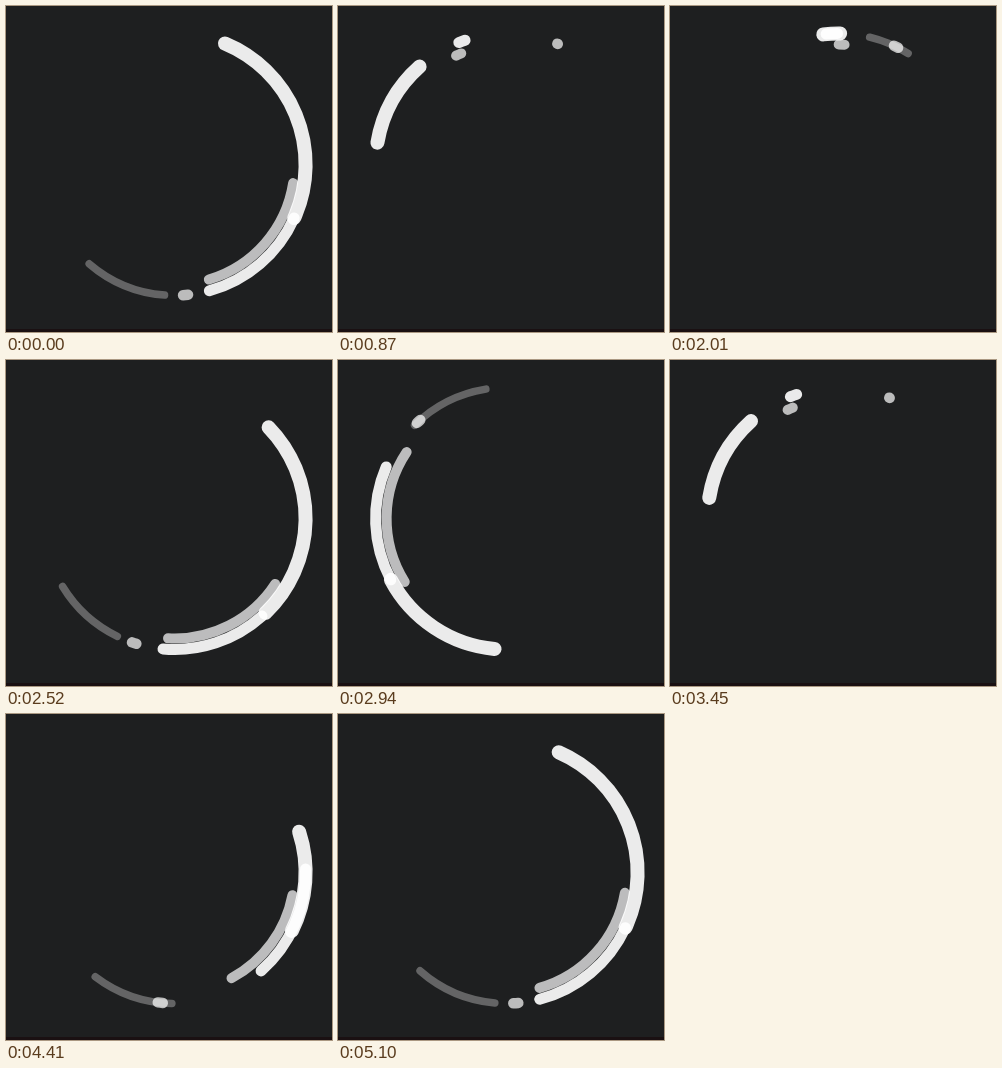
An HTML page with a canvas for the animation above (5.13 s loop, 326 by 326 pixels).

```html
<!DOCTYPE html>
<html lang="en">
<head>
<meta charset="utf-8">
<title>Ring loader</title>
<style>
  html, body { margin: 0; width: 100%; height: 100%; overflow: hidden; background: #1e1f20; }
  canvas { display: block; width: 326px; height: 326px; }
</style>
</head>
<body>
<canvas id="stage"></canvas>
<script>
const SIZE = 326, LOOP = 5130, TICK = 30;
const CENTER = { x: 168.6, y: 158.5 };

// Loop time in ms -> number of two-turn cycles completed
const CLOCK = [[0, 0], [870, 0.6901], [3450, 2.6909], [5100, 3.9989], [LOOP, 4]];

// Key positions within one cycle; angles run counter-clockwise from the right
const KEYS = [0, 0.2955, 0.4519, 0.5743, 0.6901];
const TURN = 720;
const ARCS = [
  { r: 131, width: 7.5, alpha: 0.31,
    tail: [-130.7, 99.2, 232.7, 418, 440], head: [-94.4, 134.7, 268.8, 436.3, 440] },
  { r: 131, width: 10.5, alpha: 0.7,
    tail: [-86.3, 131.3, 262.6, 423, 427], head: [-84.1, 133.3, 264.8, 425, 427.2] },
  { r: 120, width: 10, alpha: 0.7,
    tail: [-73.4, 146.5, 298.3, 447.2, 472.2], head: [-8.9, 212, 349.1, 450, 474.9] },
  { r: 131, width: 14, alpha: 0.91,
    tail: [-24.1, 208, 333.5, 449.4, 491.6], head: [67.4, 264.8, 378.1, 456.8, 530.4] },
  { r: 131, width: 11, alpha: 0.91,
    tail: [-74.6, 156.9, 311.3, 450.5, 468.5], head: [-24.1, 208, 361.5, 455.5, 471.4] }
];

// Smooth monotone curve through the keys, gaining TURN degrees per cycle
function makeCurve(values) {
  const n = KEYS.length;
  const wrap = i => ((i % n) + n) % n;
  const x = i => KEYS[wrap(i)] + Math.floor(i / n);
  const y = i => values[wrap(i)] + Math.floor(i / n) * TURN;
  const step = i => x(i + 1) - x(i);
  const rate = i => (y(i + 1) - y(i)) / step(i);
  const slope = i => {
    const a = rate(i - 1), b = rate(i);
    if (a * b <= 0) return 0;
    const u = 2 * step(i) + step(i - 1), v = step(i) + 2 * step(i - 1);
    return (u + v) / (u / a + v / b);
  };
  return p => {
    let i = n - 1;
    while (i > 0 && KEYS[i] > p) i--;
    const h = step(i), s = (p - x(i)) / h, q = 1 - s;
    return y(i) * (1 + 2 * s) * q * q + slope(i) * h * s * q * q
         + y(i + 1) * s * s * (3 - 2 * s) - slope(i + 1) * h * s * s * q;
  };
}

for (const arc of ARCS) {
  arc.tailAt = makeCurve(arc.tail);
  arc.headAt = makeCurve(arc.head);
}

function phaseAt(ms) {
  const i = CLOCK.findIndex(([t], k) => k > 0 && ms < t);
  const [t0, c0] = CLOCK[i - 1], [t1, c1] = CLOCK[i];
  return (c0 + (c1 - c0) * (ms - t0) / (t1 - t0)) % 1;
}

const canvas = document.getElementById('stage');
const ratio = window.devicePixelRatio || 1;
canvas.width = canvas.height = Math.round(SIZE * ratio);
const ctx = canvas.getContext('2d');
ctx.scale(ratio, ratio);
ctx.lineCap = 'round';

function draw(ms) {
  const phase = phaseAt(ms);
  ctx.fillStyle = '#1e1f20';
  ctx.fillRect(0, 0, SIZE, SIZE);
  ctx.fillStyle = '#1a1012';
  ctx.fillRect(0, 323, SIZE, 3);
  for (const { r, width, alpha, tailAt, headAt } of ARCS) {
    const tail = tailAt(phase), head = headAt(phase);
    if (head - tail < 0.1) continue;
    ctx.lineWidth = width;
    ctx.strokeStyle = `rgba(255, 255, 255, ${alpha})`;
    ctx.beginPath();
    ctx.arc(CENTER.x, CENTER.y, r, -head * Math.PI / 180, -tail * Math.PI / 180);
    ctx.stroke();
  }
}

const start = performance.now();
function frame() {
  const ms = (performance.now() - start) % LOOP;
  draw(Math.floor(ms / TICK) * TICK);
  requestAnimationFrame(frame);
}
frame();
</script>
</body>
</html>
```
